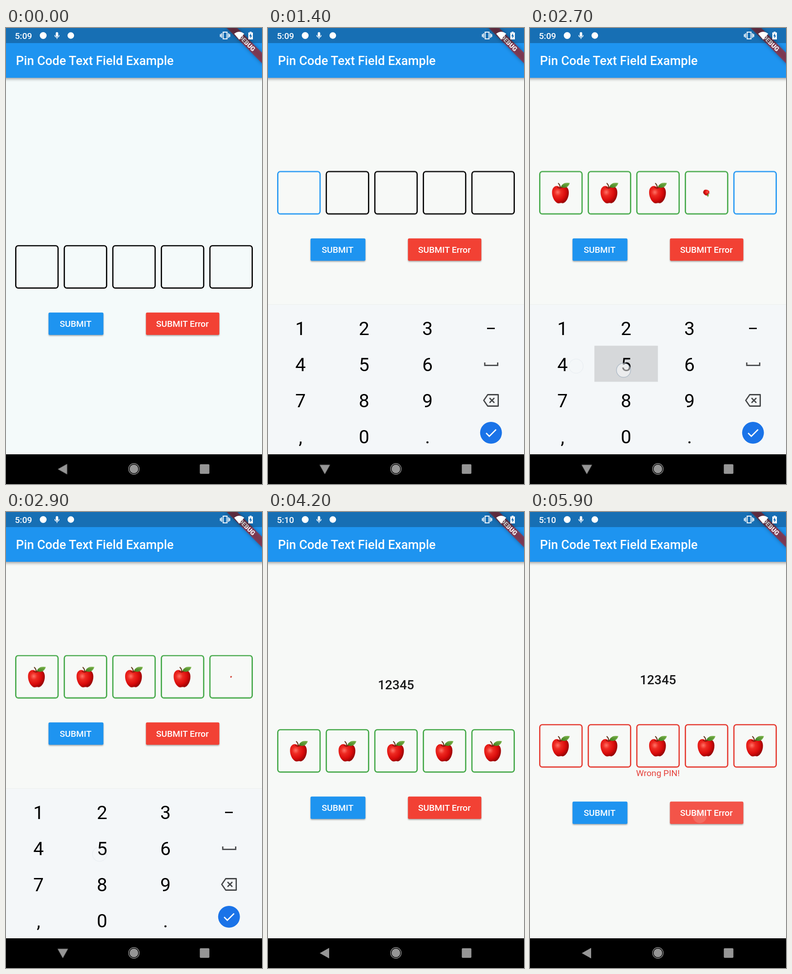
An HTML page for the animation above (6000 ms loop, 561 by 998 pixels).

```html
<!DOCTYPE html>
<html lang="en">
<head>
<meta charset="utf-8">
<title>Pin code entry</title>
<style>
:root { --t: 0ms; }
html, body { margin: 0; width: 100%; height: 100%; overflow: hidden; background: #f7f9f7; }
svg { display: block; width: 100vw; height: 100vh; font-family: Roboto, Arial, sans-serif; }
.mid { text-anchor: middle; }
.med { font-weight: 500; }

/* Every animation is paused and placed by the shared clock --t. */
.on { visibility: hidden; animation: show var(--d, 9s) linear calc(var(--s) - var(--t)) paused; }
.off { animation: hide 9s linear calc(var(--s) - var(--t)) paused; }
@keyframes show { from, to { visibility: visible; } }
@keyframes hide { from, to { visibility: hidden; } }

.pins, .buttons, .code {
  animation: lift 2000ms linear calc(1100ms - var(--t)) paused,
             var(--shift) 9s linear calc(5900ms - var(--t)) paused;
}
.pins, .code { --shift: nudge-up; }
.buttons { --shift: nudge-down; }
@keyframes lift { from, to { transform: translateY(-162.3px); } }
@keyframes nudge-up { from, to { transform: translateY(-11px); } }
@keyframes nudge-down { from, to { transform: translateY(11px); } }

.pin {
  fill: none; stroke: #000; stroke-width: 2.7px;
  animation: active 9s linear calc(var(--focus) - var(--t)) paused,
             filled 9s linear calc(var(--fill) - var(--t)) paused,
             wrong 9s linear calc(5900ms - var(--t)) paused;
}
@keyframes active { from, to { stroke: #2196f3; } }
@keyframes filled { from, to { stroke: #43a847; } }
@keyframes wrong { from, to { stroke: #e53a30; } }

.apple { animation: pop 300ms linear calc(var(--fill) - var(--t)) both paused; }
@keyframes pop {
  from { transform: scale(0) rotate(0deg); }
  to { transform: scale(1) rotate(360deg); }
}

.keyboard {
  opacity: 0;
  animation: rise 250ms ease-out calc(950ms - var(--t)) forwards paused,
             sink 250ms ease-in calc(3050ms - var(--t)) forwards paused;
}
@keyframes rise { from { opacity: 0; transform: translateY(90px); } to { opacity: 1; transform: none; } }
@keyframes sink { from { opacity: 1; transform: none; } to { opacity: 0; transform: translateY(90px); } }

.back {
  animation: turn-down 250ms ease-out calc(950ms - var(--t)) forwards paused,
             turn-left 250ms ease-in calc(3050ms - var(--t)) forwards paused;
}
@keyframes turn-down { from { transform: rotate(0deg); } to { transform: rotate(-90deg); } }
@keyframes turn-left { from { transform: rotate(-90deg); } to { transform: rotate(0deg); } }

.touch {
  fill: rgba(255, 255, 255, .5); stroke: rgba(140, 160, 180, .55); stroke-width: 1.6px; opacity: 0;
  animation: tap var(--d) linear calc(var(--s) - var(--t)) paused;
}
@keyframes tap { 0%, 62% { opacity: 1; } 100% { opacity: 0; } }

.button { filter: drop-shadow(0 2px 1.8px rgba(0, 0, 0, .32)); }
.bar { filter: drop-shadow(0 2px 3.5px rgba(0, 0, 0, .42)); }
.band { filter: drop-shadow(0 0 4px rgba(0, 0, 0, .5)); }
</style>
</head>
<body>
<svg viewBox="0 0 561 998" preserveAspectRatio="none">
  <defs>
    <radialGradient id="skin" cx=".34" cy=".36" r=".72">
      <stop offset="0" stop-color="#ff7468"/>
      <stop offset=".28" stop-color="#ee2a22"/>
      <stop offset=".65" stop-color="#d90b0b"/>
      <stop offset="1" stop-color="#8a0303"/>
    </radialGradient>
    <linearGradient id="leaf" x1="0" y1="1" x2="1" y2="0">
      <stop offset="0" stop-color="#3c7a1c"/>
      <stop offset="1" stop-color="#86bf55"/>
    </linearGradient>
    <g id="fruit">
      <path fill="url(#skin)" d="M-2-12C-8-18-19.500-15-19.500-1C-19.500 12-11 23-5 23C-2.500 23-1 22.300 0 22.300C2 22.300 3 23 5 22.500C11 21 17.500 11 17.300-1C17-15 5-18-2-12Z"/>
      <path fill="none" stroke="#7b0a06" stroke-width="1.500" d="M-8-12.500Q-2-8 4-12.500"/>
      <path fill="none" stroke="#5d3117" stroke-width="2.200" stroke-linecap="round" d="M-1.500-11Q-1.500-17-5.500-20.500"/>
      <path fill="url(#leaf)" d="M0-13C2-20 10-23.500 19.500-21.500C17-13 9-8 0-13Z"/>
      <path fill="none" stroke="#4c8527" stroke-width=".8" d="M1-13Q9-15 17-20"/>
    </g>
  </defs>

  <rect width="561" height="998" fill="#f7f9f7"/>
  <rect class="off" style="--s:1000ms" width="561" height="998" fill="#f4fafa"/>

  <g class="code">
    <text class="on mid med" style="--s:4100ms" x="280.500" y="388" font-size="28" fill="#1b1c1d">12345</text>
  </g>
  <g class="pins" id="pins"></g>
  <text class="on mid" style="--s:5900ms" x="280.300" y="577.500" font-size="19.100" fill="#e5403a">Wrong PIN!</text>

  <g class="buttons">
    <rect class="button" x="93.200" y="622.700" width="120.300" height="49" rx="2.700" fill="#1e94f0"/>
    <rect class="button" x="306.700" y="622.700" width="160.800" height="49" rx="2.700" fill="#f24134"/>
    <g class="on" style="--s:4000ms;--d:200ms">
      <rect x="93.200" y="622.700" width="120.300" height="49" rx="2.700" fill="#fff" opacity=".12"/>
    </g>
    <g class="on" style="--s:5900ms" fill="#fff">
      <rect x="306.700" y="622.700" width="160.800" height="49" rx="2.700" opacity=".1"/>
      <circle cx="372" cy="655" r="15" opacity=".14"/>
    </g>
    <g class="mid med" font-size="19.100" fill="#fff">
      <text x="152.500" y="654">SUBMIT</text>
      <text x="386.600" y="654">SUBMIT Error</text>
    </g>
  </g>

  <rect class="bar" x="-10" y="-10" width="581" height="119" fill="#1e94f0"/>
  <text class="med" x="21.800" y="81" font-size="27.270" fill="#fff">Pin Code Text Field Example</text>

  <g transform="translate(561 0) rotate(45)">
    <rect class="band" x="-60" y="38.200" width="120" height="16.400" fill="#b71c1c" fill-opacity=".63"/>
    <text class="mid" y="51.300" font-size="13.900" font-weight="900" fill="#fff">DEBUG</text>
  </g>

  <rect width="561" height="33" fill="#000" opacity=".25"/>
  <g fill="#fff">
    <g class="med" font-size="19.100">
      <text class="off" style="--s:3000ms" x="19.500" y="24">5:09</text>
      <text class="on" style="--s:3000ms" x="19.500" y="24">5:10</text>
    </g>
    <circle cx="81.500" cy="16.500" r="7.500"/>
    <rect x="109" y="9" width="5.400" height="10" rx="2.700"/>
    <path fill="none" stroke="#fff" stroke-width="1.500" d="M106.800 15.500A4.900 5 0 0 0 116.600 15.500M111.700 20.500V24"/>
    <circle cx="142" cy="16.500" r="7.200"/>
    <path fill="none" stroke="#fff" stroke-width="2" d="M475.800 9H484.400V23.800H475.800ZM472.400 11.500V21.500M469.700 13.500V19.500M487.700 11.500V21.500M490.300 13.500V19.500"/>
    <path d="M500 12.500Q511 4 522 12.500L511 25.500Z"/>
    <path d="M534 8H538V9.700H541V25H531V9.700H534Z"/>
    <path fill="#176db3" d="M537 11.500L533 18H535.500V23L539.300 16.500H537Z"/>
  </g>

  <g class="keyboard">
    <rect y="604.500" width="561" height="2" fill="#eef1f1"/>
    <rect y="606" width="561" height="428" fill="#f4f7f9"/>
    <g id="keys" class="mid" font-size="40.900"></g>
    <path stroke="#111" stroke-width="3" d="M480 657.500H497"/>
    <g fill="none" stroke="#454749" stroke-width="2.800">
      <path d="M475 732V738.300H503.300V732"/>
      <path stroke-linejoin="round" d="M481.500 802.500H504.500V827.500H481.500L472.800 815Z"/>
      <path d="M485.500 809.800L496 820.300M496 809.800L485.500 820.300"/>
    </g>
    <circle cx="488.700" cy="885.800" r="23.900" fill="#1a73e8"/>
    <path fill="none" stroke="#fff" stroke-width="2.700" d="M478 886.500L485 893.500L499.800 878.700"/>
  </g>

  <g id="touches"></g>

  <rect y="933" width="561" height="65" fill="#000"/>
  <g fill="#969696">
    <g transform="translate(124.500 965.500)"><path class="back" d="M-11 0L9.500-11.500V11.500Z"/></g>
    <circle cx="280.300" cy="965" r="9.500"/>
    <circle cx="280.300" cy="965" r="11.700" fill="none" stroke="#969696" stroke-width="1.400"/>
    <rect x="424.700" y="954.800" width="21" height="21" rx="2"/>
  </g>
</svg>

<script>
const LOOP = 6000, STEP = 100;
const fills = [1625, 1950, 2275, 2600, 2875];
const put = (id, html) => { document.getElementById(id).innerHTML = html; };

put('pins', fills.map((fill, i) => {
  const x = 21.4 + i * 106.37;
  const focus = i ? fills[i - 1] : 1000;
  return `<g style="--focus:${focus}ms;--fill:${fill}ms">
    <rect class="pin" x="${x}" y="476.500" width="92.700" height="92.700" rx="5.500"/>
    <g transform="translate(${x + 46.35} 523)"><use class="apple" href="#fruit"/></g></g>`;
}).join(''));

const colX = c => 71.2 + c * 139.2;
const rowY = r => 616.5 + r * 78.9;
const keyText = ['123', '456', '789', ',0.'].map((row, r) =>
  [...row].map((ch, c) => `<text x="${colX(c)}" y="${rowY(r) + 55.3}">${ch}</text>`).join('')).join('');

// Taps on keys 1 to 5: start time, x, y
const taps = [[1450, 85, 660], [1750, 222, 661], [2100, 363, 658], [2400, 101, 740], [2600, 205, 749]];
const presses = taps.map(([s], i) =>
  `<rect class="on" style="--s:${s + 100}ms;--d:150ms" x="${colX(i % 3) - 69.3}" y="${rowY(i / 3 | 0)}"
    width="139.200" height="78.900" fill="#000" opacity=".125"/>`).join('');
put('keys', presses + keyText);

const touch = (s, x, y, d = 320) =>
  `<circle class="touch" style="--s:${s}ms;--d:${d}ms" cx="${x}" cy="${y}" r="15.500"/>`;
put('touches', taps.map(tap => touch(...tap)).join('') +
  touch(900, 70, 525, 250) + touch(4000, 155, 650, 200) + touch(5800, 372, 666, 100));

const begin = performance.now();
let shown = -1;
function tick() {
  const t = Math.floor((performance.now() - begin) % LOOP / STEP) * STEP;
  if (t !== shown) document.documentElement.style.setProperty('--t', t + 'ms');
  shown = t;
  requestAnimationFrame(tick);
}
tick();
</script>
</body>
</html>
```
